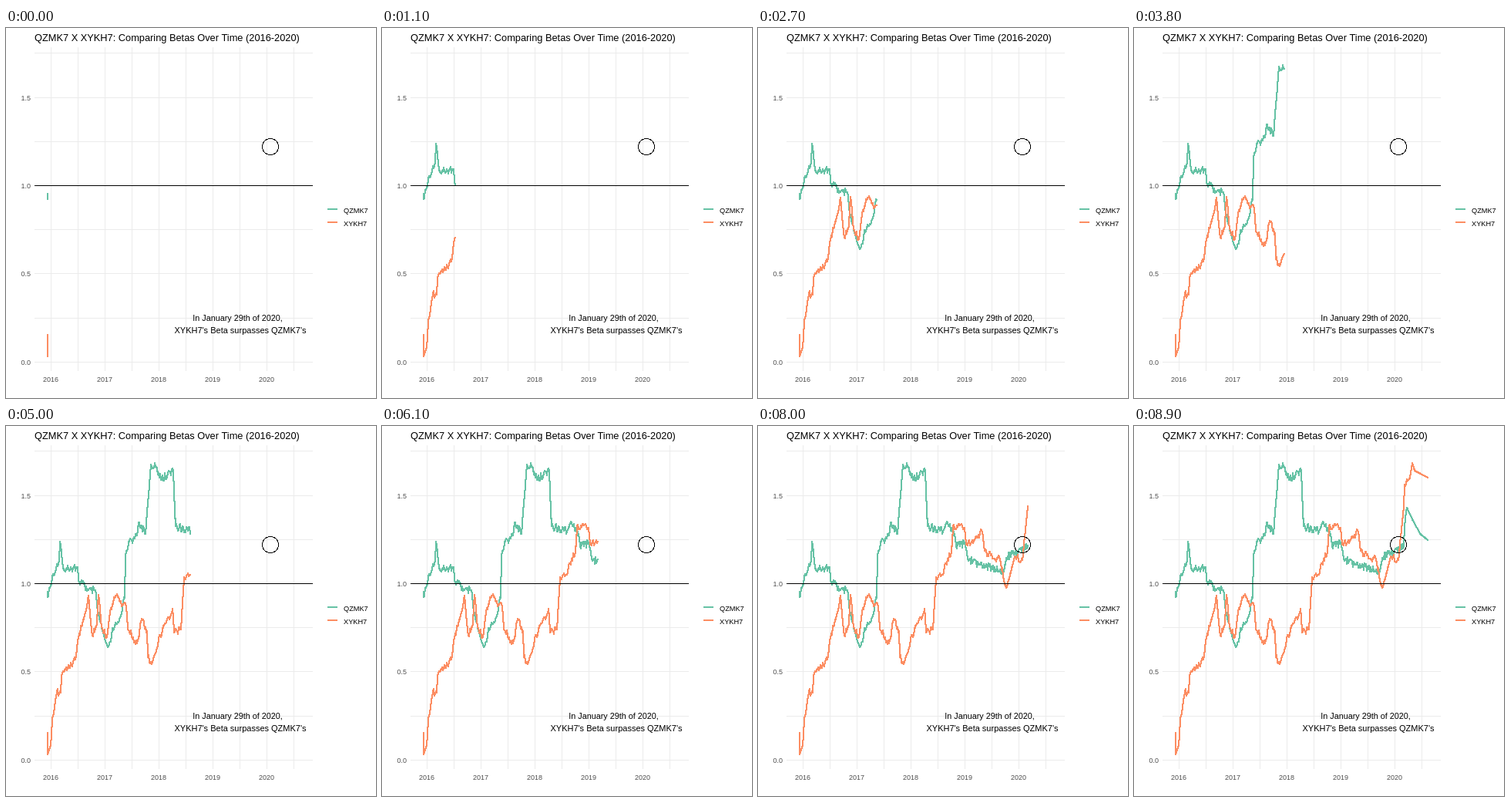
An HTML page with a canvas for the animation above (10 s loop, 480 by 480 pixels).

```html
<!DOCTYPE html>
<html lang="en">
<head>
<meta charset="utf-8">
<title>Comparing Betas Over Time</title>
<style>
  html, body { margin: 0; width: 100%; height: 100%; overflow: hidden; background: #fff; }
  canvas { display: block; }
</style>
</head>
<body>
<canvas id="chart" width="480" height="480"></canvas>
<script>
const ctx = document.getElementById('chart').getContext('2d');
const LOOP = 10000, STEP = 100;
const LEFT = 54, RIGHT = 381, REVEAL_SPEED = 3.7;
const ROUGHNESS = 5, SMOOTH_FROM = 355;
const YEAR_WIDTH = 70, HALF_ROW = 57.22, ZERO_Y = 432.9;
const FONT = '"Liberation Sans", Arial, sans-serif';

// Only the turning points are listed; seeded roughness fills the stretches between.
const series = [
  { name: 'QZMK7', color: '#66c2a5', seed: 3, legendY: 235, turns: [
    [54, 215], [54, 222], [61, 192], [69, 174], [70, 150], [75, 187], [93, 183], [94, 199],
    [106, 212], [116, 213], [119, 241], [131, 284], [136, 280], [138, 262], [147, 250],
    [154, 223], [155, 168], [159, 151], [170, 142], [172, 125], [181, 139], [188, 50],
    [195, 54], [201, 70], [217, 58], [220, 130], [240, 136], [246, 126], [255, 142],
    [257, 156], [268, 152], [272, 172], [288, 180], [318, 188], [322, 171], [336, 163],
    [350, 155], [351, 130], [354, 106], [362, 123], [371, 140], [381, 148]] },
  { name: 'XYKH7', color: '#fc8d62', seed: 8, legendY: 252, turns: [
    [54, 398], [54, 426], [58, 414], [60, 380], [66, 345], [71, 346], [72, 325], [90, 303],
    [93, 277], [105, 236], [107, 220], [112, 272], [118, 256], [120, 219], [124, 260],
    [131, 274], [136, 236], [142, 220], [156, 236], [158, 264], [170, 282], [176, 250],
    [183, 266], [184, 300], [189, 309], [200, 272], [216, 237], [218, 268], [227, 263],
    [231, 196], [238, 194], [251, 162], [253, 130], [268, 133], [270, 154], [291, 137],
    [294, 162], [314, 174], [322, 210], [334, 171], [343, 174], [350, 104], [351, 76],
    [358, 67], [361, 48], [364, 58], [381, 67]] }
];
const [first, second] = series.map(s => s.name);

function noise(n, seed) {
  const v = Math.sin(n * 12.9898 + seed * 78.233) * 43758.5453;
  return (v - Math.floor(v)) * 2 - 1;
}

// Calls visit(x, y) for evenly spaced positions after a, up to and including b.
function walk([x0, y0], [x1, y1], count, visit) {
  for (let i = 1; i <= count; i++) {
    visit(x0 + (x1 - x0) * i / count, y0 + (y1 - y0) * i / count);
  }
}

function roughen({ turns, seed }) {
  const points = [turns[0]];
  for (let i = 1; i < turns.length; i++) {
    const [endX] = turns[i];
    walk(turns[i - 1], turns[i], Math.max(1, endX - turns[i - 1][0]), (x, y) => {
      const rough = x < endX && x < SMOOTH_FROM;
      points.push([x, rough ? y + noise(x, seed) * ROUGHNESS : y]);
    });
  }
  return points;
}

// Pixel-stepped trace of one series, ordered by x.
function trace(points) {
  const dots = [points[0]];
  for (let i = 1; i < points.length; i++) {
    const count = Math.max(2, Math.ceil(Math.abs(points[i][1] - points[i - 1][1])));
    walk(points[i - 1], points[i], count, (x, y) => dots.push([x, y]));
  }
  return dots;
}
for (const s of series) s.dots = trace(roughen(s));

function rect(color, x, y, w, h) {
  ctx.fillStyle = color;
  ctx.fillRect(x, y, w, h);
}

function text(str, x, y, size, align = 'left', color = '#000') {
  ctx.font = `${size}px ${FONT}`;
  ctx.textAlign = align;
  ctx.fillStyle = color;
  ctx.fillText(str, x, y);
}

function drawGrid() {
  for (let i = 0; i < 8; i++) rect('#ebebeb', 37, Math.round(ZERO_Y - i * HALF_ROW), 361, 1);
  for (let x = 58; x < 398; x += YEAR_WIDTH / 2) rect('#ebebeb', x, 25, 1, 420);
}

function drawLabels() {
  text(`${first} X ${second}: Comparing Betas Over Time (2016-2020)`, 37, 17, 12.8);
  for (let i = 0; i < 5; i++) text(2016 + i, 58 + i * YEAR_WIDTH, 459, 9, 'center', '#4d4d4d');
  for (let i = 0; i < 4; i++) {
    text((i / 2).toFixed(1), 32, Math.round(ZERO_Y - i * 2 * HALF_ROW) + 4, 9, 'right', '#4d4d4d');
  }
  for (const s of series) {
    rect(s.color, 417, s.legendY - 1, 13, 2);
    text(s.name, 438, s.legendY + 5, 9.2);
  }
  text('In January 29th of 2020,', 300.5, 380, 10.8, 'center');
  text(`${second}'s Beta surpasses ${first}'s`, 304, 396, 11, 'center');
}

function drawCircle(cx, cy, radius) {
  for (let a = 0; a < 360; a += 2) {
    const t = a * Math.PI / 180;
    rect('#000', Math.round(cx + radius * Math.cos(t)), Math.round(cy + radius * Math.sin(t)), 1, 1);
  }
}

function draw(time) {
  const step = Math.floor(time % LOOP / STEP);
  const end = Math.min(RIGHT, LEFT + step * REVEAL_SPEED);
  rect('#fff', 0, 0, 480, 480);
  drawGrid();
  for (const { color, dots } of series) {
    for (const [x, y] of dots) {
      if (x > end) break;
      rect(color, Math.round(x) - 1, Math.round(y) - 1, 2, 2);
    }
  }
  rect('#000', 37, 204, 361, 1);
  drawCircle(342.5, 153.5, 10.5);
  drawLabels();
}

const origin = performance.now();
function tick() {
  draw(performance.now() - origin);
  requestAnimationFrame(tick);
}
tick();
</script>
</body>
</html>
```
